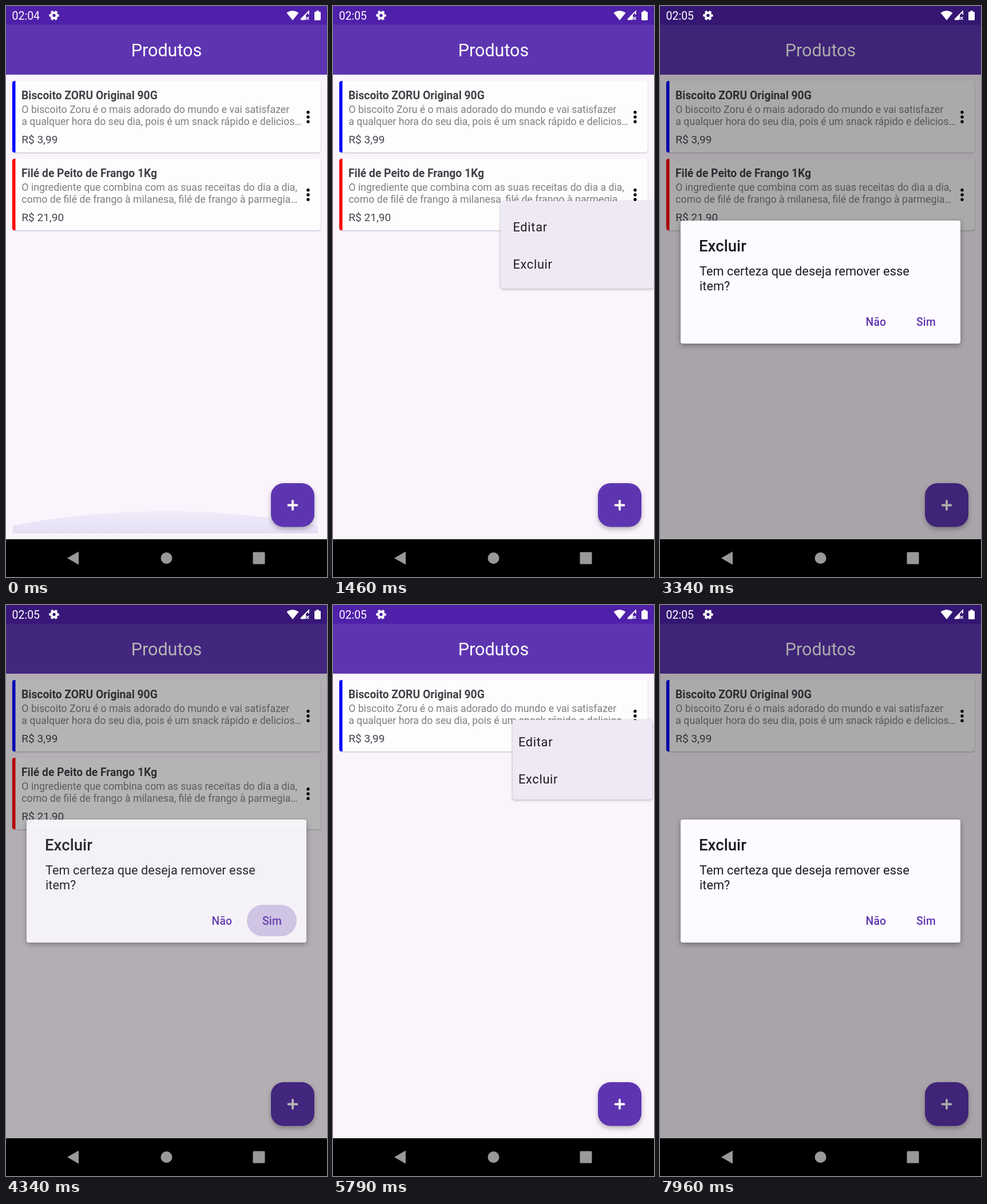
Recreate the animation shown at these times as an HTML page. Size 561 px wide and 998 px high, loop 8 s.

```html
<!DOCTYPE html>
<html lang="pt-BR">
<head>
<meta charset="utf-8">
<title>Produtos</title>
<style>
html, body { margin: 0; width: 100%; height: 100%; overflow: hidden; background: #fcf4fd; }
#stage { position: relative; width: 561px; height: 998px; overflow: hidden; font-family: Roboto, sans-serif; }
#stage > * { position: absolute; }
svg { position: absolute; left: 0; top: 0; display: block; overflow: visible; }

.bar-title { font-size: 30.5px; fill: #fff; text-anchor: middle; }
.clock { font-size: 19.5px; fill: #fff; }
.card > rect:first-child { fill: #fefdfe; filter: drop-shadow(0 1px 1px rgba(40, 30, 60, .3)); }
.name { font-size: 19.3px; font-weight: 700; fill: #424047; }
.info { font-size: 17.73px; fill: #807e84; }
.price { font-size: 19.1px; fill: #49454f; }
.fab { fill: #5e35b1; filter: drop-shadow(0 4px 4px rgba(0, 0, 0, .28)); }

.menu { left: 293px; width: 268px; height: 153px; overflow: hidden; border-radius: 5px;
  background: #efe9f5; box-shadow: 0 1px 4px rgba(0, 0, 0, .32);
  animation: reveal 8s var(--at) infinite both, show 8s var(--at) infinite both; }
.menu svg { animation: settle 8s var(--at) infinite both; }
.menu rect { fill: #000; fill-opacity: .13; animation: press 8s var(--at) infinite both; }
.menu text { font-size: 21.8px; letter-spacing: .68px; fill: #1d1b20; }
.lower { top: 341px; --at: 1130ms; }
.upper { top: 205px; --at: 5660ms; }

.dim { left: 0; top: 0; width: 561px; height: 932px; background: #000; animation: dim 8s infinite; }
.dialog { animation: dialog 8s infinite; }
.panel { fill: #fdfbff; filter: drop-shadow(0 3px 5px rgba(0, 0, 0, .35)); }
.heading { font-size: 27.6px; font-weight: 500; fill: #1d1b20; }
.message { font-size: 21.8px; fill: #1d1b20; }
.button { font-size: 19.3px; font-weight: 500; letter-spacing: .2px; fill: #5e35b1; }
.ripple { fill: #5e35b1; animation: ripple 8s infinite; }
.removed { animation: remove 8s infinite; }
.leaving { animation: leave 8s infinite; }
.before { animation: before 8s infinite step-end; }
.after { animation: after 8s infinite step-end; }

@keyframes reveal {
  0% { margin: -27px 0 0 147px; width: 101px; height: 53px; animation-timing-function: cubic-bezier(0, 0, .2, 1); }
  3.125%, 100% { margin: 0; width: 268px; height: 153px; }
}
@keyframes settle {
  0% { transform: translate(-80px, -46px); animation-timing-function: cubic-bezier(0, 0, .2, 1); }
  3.125%, 100% { transform: none; }
}
@keyframes show {
  0% { opacity: 0; }
  1.25%, 13.75% { opacity: 1; }
  15.625%, 100% { opacity: 0; }
}
@keyframes press {
  0%, 10.4% { opacity: 0; }
  11.2%, 100% { opacity: 1; }
}
@keyframes dim {
  0%, 26.5% { opacity: 0; }
  27.5% { opacity: .09; }
  29.25% { opacity: .26; }
  30.4%, 53.5% { opacity: .33; }
  54.25% { opacity: .29; }
  56.25%, 83.4% { opacity: 0; }
  84.375% { opacity: .085; }
  86.1% { opacity: .26; }
  87.3%, 100% { opacity: .33; }
}
@keyframes dialog {
  0%, 26.5% { opacity: 0; }
  27.5% { opacity: .55; }
  28.6%, 53.5% { opacity: 1; }
  54.25% { opacity: .9; }
  55.6%, 83.4% { opacity: 0; }
  84.375% { opacity: .55; }
  85.5%, 100% { opacity: 1; }
}
@keyframes ripple {
  0%, 51.8% { opacity: 0; }
  53%, 56% { opacity: .26; }
  56.1%, 100% { opacity: 0; }
}
@keyframes remove {
  0%, 55.5% { opacity: 1; }
  57%, 100% { opacity: 0; }
}
@keyframes leave {
  0%, .5% { opacity: 1; }
  2.5%, 100% { opacity: 0; }
}
@keyframes before { 0% { opacity: 1; } 9%, 100% { opacity: 0; } }
@keyframes after { 0% { opacity: 0; } 9%, 100% { opacity: 1; } }
</style>
</head>
<body>
<div id="stage">
  <svg width="561" height="998">
    <defs>
      <linearGradient id="haze" x2="0" y2="1">
        <stop stop-color="#e4e0f5" stop-opacity=".5"/>
        <stop offset="1" stop-color="#e4e0f5"/>
      </linearGradient>
      <g id="dots"><circle cx="528" cy="185.8" r="2.7"/><circle cx="528" cy="194" r="2.7"/><circle cx="528" cy="202.2" r="2.7"/></g>
      <path id="edge" d="M16.5 131H15a4 4 0 0 0-4 4V252a4 4 0 0 0 4 4H16.5Z"/>
    </defs>
    <rect width="561" height="998" fill="#fcf4fd"/>
    <rect width="561" height="120" fill="#5e35b1"/>
    <rect width="561" height="32.7" fill="#4f20a9"/>
    <text class="bar-title" x="280.5" y="88">Produtos</text>

    <g class="card">
      <rect x="11" y="131" width="539" height="125" rx="5"/>
      <use href="#edge" fill="#00f"/>
      <text class="name" x="27" y="163">Biscoito ZORU Original 90G</text>
      <text class="info" x="27.3" y="187.3">O biscoito Zoru é o mais adorado do mundo e vai satisfazer</text>
      <text class="info" x="27.3" y="208.3">a qualquer hora do seu dia, pois é um snack rápido e delicios…</text>
      <text class="price" x="27.3" y="239.5">R$ 3,99</text>
      <use href="#dots"/>
    </g>

    <g class="removed"><g class="card" transform="translate(0 136)">
      <rect x="11" y="131" width="539" height="125" rx="5"/>
      <use href="#edge" fill="#f00"/>
      <text class="name" x="27" y="163">Filé de Peito de Frango 1Kg</text>
      <text class="info" x="27.3" y="187.3">O ingrediente que combina com as suas receitas do dia a dia,</text>
      <text class="info" x="27.3" y="208.3">como de filé de frango à milanesa, filé de frango à parmegia…</text>
      <text class="price" x="27.3" y="239.5">R$ 21,90</text>
      <use href="#dots"/>
    </g></g>

    <path class="leaving" d="M12 908Q280 858 545 908V922H12Z" fill="url(#haze)"/>
    <rect class="fab" x="463" y="834" width="76" height="76.5" rx="22"/>
    <path d="M493.5 872.5H508.5M501 865V880" stroke="#fff" stroke-width="3.8" stroke-linecap="round"/>
  </svg>

  <div class="menu lower"><svg width="268" height="153">
    <rect y="77" width="268" height="65.5"/>
    <text x="21.5" y="52.5">Editar</text>
    <text x="21.5" y="118">Excluir</text>
  </svg></div>
  <div class="menu upper"><svg width="268" height="153">
    <rect y="77" width="268" height="65.5"/>
    <text x="21.5" y="52.5">Editar</text>
    <text x="21.5" y="118">Excluir</text>
  </svg></div>

  <div class="dim"></div>

  <svg class="dialog" width="561" height="998">
    <rect class="panel" x="36" y="375" width="489" height="215" rx="4"/>
    <rect class="ripple" x="421" y="524" width="87" height="55" rx="27.5"/>
    <text class="heading" x="68" y="429">Excluir</text>
    <text class="message" x="69" y="471.3">Tem certeza que deseja remover esse</text>
    <text class="message" x="69" y="496.8">item?</text>
    <text class="button" x="359.5" y="559">Não</text>
    <text class="button" x="448" y="559">Sim</text>
  </svg>

  <svg width="561" height="998">
    <text class="clock before" x="10.5" y="24">02:04</text>
    <text class="clock after" x="10.5" y="24">02:05</text>
    <g fill="none" stroke="#fff">
      <circle cx="84" cy="16.5" r="4.7" stroke-width="4"/>
      <circle cx="84" cy="16.5" r="7.4" stroke-width="2.6" stroke-dasharray="4.2 3.55" stroke-dashoffset="2.1"/>
      <path d="M515 23.5L529 9.5V15M515 23.5H522" stroke-width="1.8"/>
      <path d="M524.5 19L529.5 24M529.5 19L524.5 24" stroke-width="1.6"/>
    </g>
    <path d="M501 25L490.5 12Q501 4.5 511.5 12ZM515 24L524 15V24ZM542.5 8H546.5V10H548.5Q550 10 550 11.5V23.5Q550 25 548.5 25H540.5Q539 25 539 23.5V11.5Q539 10 540.5 10H542.5Z" fill="#fff"/>
    <rect y="932" width="561" height="66"/>
    <g fill="#999">
      <path d="M107 965L127 953.5V976.5Z"/>
      <circle cx="280.5" cy="965" r="10"/>
      <rect x="431.5" y="954.5" width="21" height="21" rx="1.5"/>
    </g>
  </svg>
</div>
</body>
</html>
```
